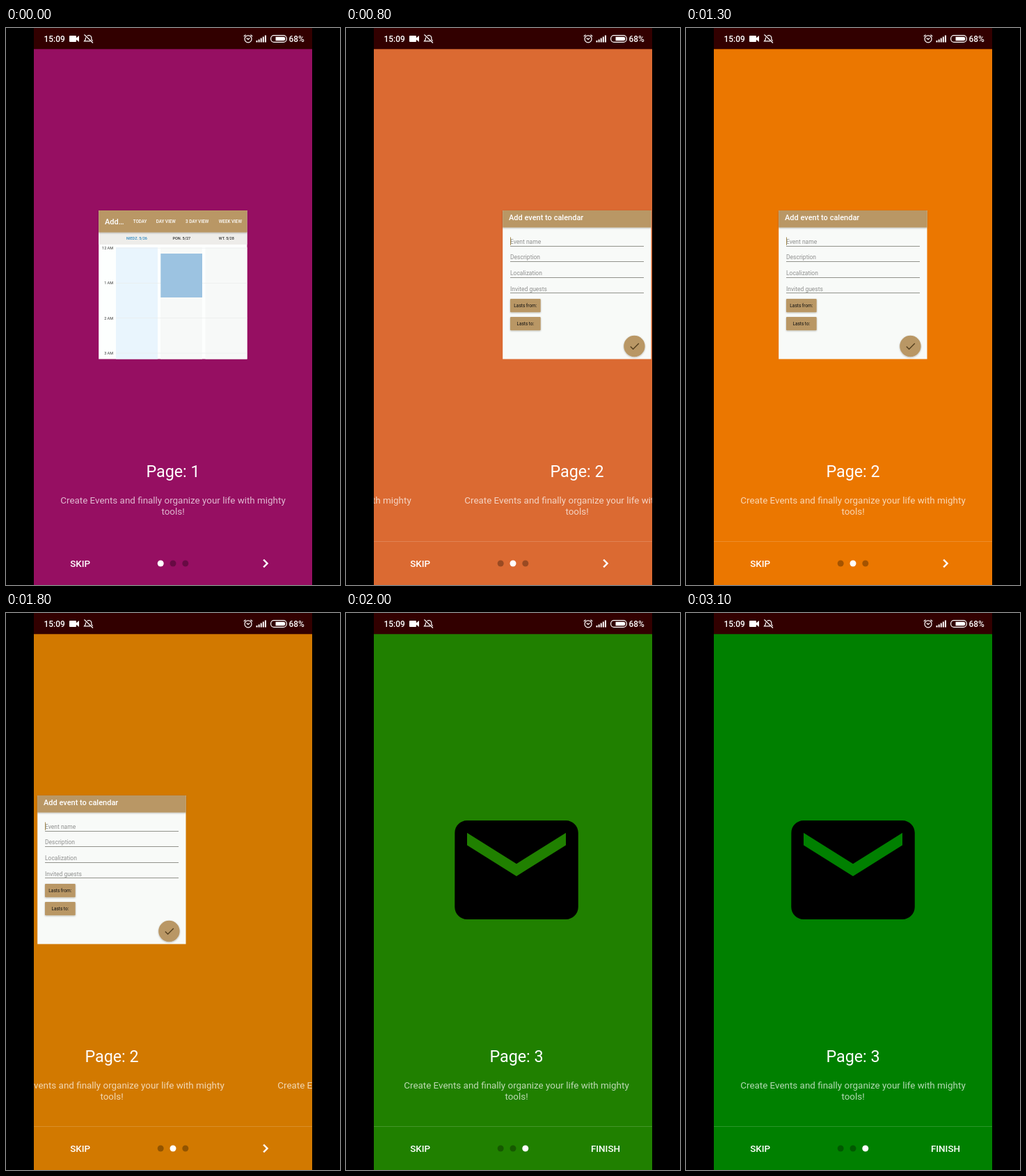
These frames come from a looping animation (480 px wide and 800 px high, 3200 ms). An HTML page:

```html
<!DOCTYPE html>
<html lang="en">
<head>
<meta charset="utf-8">
<title>Intro slides</title>
<style>
  html, body { margin: 0; height: 100%; overflow: hidden; background: #000; }
  svg { display: block; width: 100%; height: 100%; font-family: Roboto, sans-serif; }
  .mid { text-anchor: middle; }
  .end { text-anchor: end; }
  .medium { font-weight: 500; }
  .line { fill: none; stroke: #fff; stroke-width: 1.2; }
</style>
</head>
<body>
<svg viewBox="0 0 480 800">
  <defs>
    <clipPath id="screen"><rect x="40" width="400" height="800"/></clipPath>
    <filter id="shadow" x="-20%" y="-20%" width="140%" height="150%">
      <feDropShadow dx="0" dy=".8" stdDeviation=".8" flood-opacity=".3"/>
    </filter>
  </defs>
  <rect width="480" height="800"/>
  <g clip-path="url(#screen)">
    <rect id="backdrop" x="40" y="30" width="400" height="770"/>
    <g id="pages"></g>
  </g>

  <rect id="divider" x="40" y="737" width="400" height="1" fill="#fff" opacity=".16"/>
  <g fill="#fff" class="medium" font-size="13.4">
    <text x="106.6" y="774.3" class="mid">SKIP</text>
    <path id="next" transform="translate(361 757)" stroke="#fff" stroke-width=".5"
      d="M10 6L8.59 7.41 13.17 12l-4.58 4.59L10 18l6-6z"/>
    <text id="finish" x="373" y="774.3" class="mid">FINISH</text>
  </g>
  <g id="dots"></g>

  <rect x="40" width="400" height="30.3" fill="#320000"/>
  <g fill="#fff" class="medium" font-size="11.9">
    <text x="54.5" y="20">15:09</text>
    <text x="406.5" y="20">68%</text>
    <path d="M92 11h8q1 0 1 1v2.3l4-3.3v9l-4-3.3V19q0 1-1 1h-8q-1 0-1-1v-7q0-1 1-1z"/>
    <path class="line" d="M112.5 9.5l12.5 12M114.8 13.5q-.6 1.3-.6 3l-1.7 2.3h8.5M116.5 11.2q4.8-2 6.3 2.3v2.8l1.7 2.3"/>
    <circle class="line" cx="348" cy="15.8" r="5"/>
    <path class="line" d="M345.7 14.5l2.3 2 2.3-2M341.8 12l2.7-2.3M354.2 12l-2.7-2.3"/>
    <path d="M359.5 18h2v2.5h-2zM362.6 16.5h2v4h-2zM365.7 14.5h2v6h-2zM368.8 12.5h2v8h-2zM371.9 10.5h2v10h-2z"/>
    <rect class="line" x="380.6" y="10.7" width="22.6" height="9.6" rx="4.5"/>
    <path d="M387.5 12.7h11.5q2.2 0 2.2 2.2v1.2q0 2.2-2.2 2.2h-11.5z"/>
  </g>
</svg>
<script>
const LOOP = 3200, STEP = 100, WIDTH = 400, GAMMA = 2.2;
const TAN = '#b99765';
const CARD_X = 133.2, CARD_WIDTH = 213.3;
const PAGE_COLORS = [[150, 15, 98], [235, 119, 0], [0, 128, 0]];
const SCROLL_KEYS = [
  [0, 0], [600, 0], [700, 90], [800, 308], [900, 385], [1000, 400],
  [1700, 400], [1800, 488], [1900, 705], [2000, 795], [2100, 800], [LOOP, 800]
];
const byId = id => document.getElementById(id);

const rect = (x, y, w, h, fill, more = '') =>
  `<rect x="${x}" y="${y}" width="${w}" height="${h}" fill="${fill}" ${more}/>`;
const text = (x, y, size, fill, content, cls = '') =>
  `<text x="${x}" y="${y}" font-size="${size}" fill="${fill}" class="${cls}">${content}</text>`;
const band = (y, h, fill, more) => rect(CARD_X, y, CARD_WIDTH, h, fill, more);
const shadowed = 'filter="url(#shadow)"';

function calendarCard() {
  const columns = [[158, '#e9f5fd'], [222, '#f7f9f8'], [286.5, '#f7f9f8']];
  const menu = [[182.7, 'TODAY'], [215.7, 'DAY VIEW'], [258, '3 DAY VIEW'], [305.8, 'WEEK VIEW']];
  const days = [[188, 'NIEDZ. 5/26', '#2a85bd'], [252.3, 'PON. 5/27', '#333'], [316.8, 'WT. 5/28', '#333']];
  const hours = ['12 AM', '1 AM', '2 AM', '3 AM'];
  return band(262, 213.5, '#fdfffe')
    + columns.map(([x, fill]) => rect(x, 315, 60, 160.5, fill)).join('')
    + hours.map((hour, i) => {
        const y = 315.8 + i * 50.3;
        return rect(158, y, 188.5, .6, '#e9ebea') + text(154, y + 2.2, 5.5, '#333', hour, 'end');
      }).join('')
    + rect(222.3, 324, 59.7, 63, '#9cc3e1')
    + band(293, 18, '#eeedea')
    + days.map(([x, day, fill]) => text(x, 304.4, 5.5, fill, day, 'mid medium')).join('')
    + band(262, 31.5, TAN, shadowed)
    + text(142, 282, 11, '#fff', 'Add…', 'medium')
    + menu.map(([x, label]) => text(x, 280.3, 6.3, '#fff', label, 'medium')).join('');
}

function formCard() {
  const fields = ['Event name', 'Description', 'Localization', 'Invited guests'];
  const buttons = [[389, 'Lasts from:'], [415, 'Lasts to:']];
  return band(262, 213.5, '#f8faf8')
    + band(262, 24.5, TAN, shadowed)
    + text(142, 276, 11, '#fff', 'Add event to calendar', 'medium')
    + fields.map((label, i) => {
        const y = 309.7 + i * 22.6;
        return text(144, y, 8.5, '#909190', label) + rect(144, Math.floor(y + 3.4), 192, 1, '#92938c');
      }).join('')
    + rect(144, 300.5, 1, 11.5, '#a58b50')
    + buttons.map(([y, label]) => rect(144, y, 43.7, 19.3, TAN, 'rx="1" ' + shadowed)
        + text(165.8, y + 12.2, 6.5, '#111', label, 'mid')).join('')
    + `<circle cx="322.4" cy="457" r="15.2" fill="${TAN}" ${shadowed}/>`
    + '<path d="M316.8 457.5l3.8 3.8 8.2-8.2" fill="none" stroke="#554020" stroke-width="1.4"/>';
}

const envelope = () => `<path transform="translate(133.5 262.5) scale(8.875)"
  d="M20 4H4c-1.1 0-1.99.9-1.99 2L2 18c0 1.1.9 2 2 2h16c1.1 0 2-.9 2-2V6c0-1.1-.9-2-2-2zm0 4l-8 5-8-5V6l8 5 8-5v2z"/>`;

byId('pages').innerHTML = [calendarCard, formCard, envelope].map((picture, i) =>
  `<g transform="translate(${i * WIDTH})">${picture()}`
  + text(240, 645, 23.3, '#fff', `Page: ${i + 1}`, 'mid')
  + '<g opacity=".7">'
  + text(240, 682.8, 13.42, '#fff', 'Create Events and finally organize your life with mighty', 'mid')
  + text(240, 698.5, 13.42, '#fff', 'tools!', 'mid')
  + '</g></g>').join('');

byId('dots').innerHTML = [222.2, 240, 257.8].map(x => `<circle cx="${x}" cy="769" r="4.5"/>`).join('');
const dots = [...byId('dots').children];

function scrollAt(time) {
  const i = SCROLL_KEYS.findIndex(([end]) => time < end);
  const [t0, x0] = SCROLL_KEYS[i - 1], [t1, x1] = SCROLL_KEYS[i];
  return x0 + (x1 - x0) * (time - t0) / (t1 - t0);
}

// Blends in linear light rather than in display values.
function blend(from, to, mix) {
  return from.map((c, i) =>
    Math.round((c ** GAMMA * (1 - mix) + to[i] ** GAMMA * mix) ** (1 / GAMMA)));
}

function draw(now) {
  const time = Math.floor(now % LOOP / STEP) * STEP;
  const scroll = scrollAt(time);
  const page = Math.round(scroll / WIDTH);
  const left = Math.min(1, Math.floor(scroll / WIDTH));
  const color = blend(PAGE_COLORS[left], PAGE_COLORS[left + 1], scroll / WIDTH - left);

  byId('backdrop').setAttribute('fill', `rgb(${color})`);
  byId('pages').setAttribute('transform', `translate(${-scroll})`);
  byId('divider').style.visibility = time < STEP ? 'hidden' : 'visible';
  byId('next').style.display = page < 2 ? '' : 'none';
  byId('finish').style.display = page < 2 ? 'none' : '';
  dots.forEach((dot, i) => {
    dot.setAttribute('fill', i === page ? '#fff' : '#000');
    dot.setAttribute('opacity', i === page ? 1 : .3);
  });
}

const start = performance.now();
function tick() {
  draw(performance.now() - start);
  requestAnimationFrame(tick);
}
tick();
</script>
</body>
</html>
```
